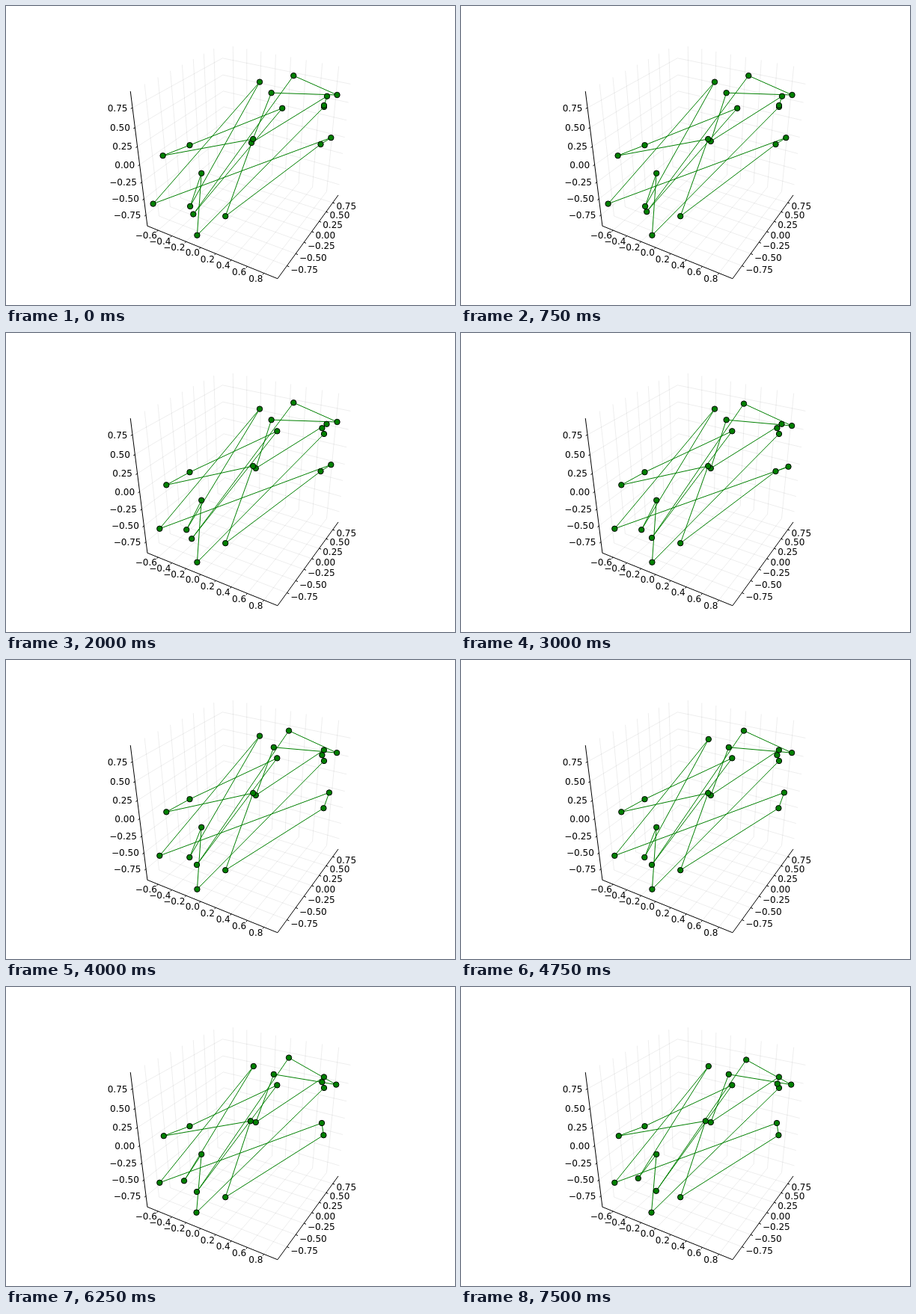
An HTML page with a canvas that plays this animation: 600 px wide and 400 px high, repeating every 8000 ms.

```html
<!DOCTYPE html>
<html lang="en">
<head>
<meta charset="utf-8">
<title>Closed path in 3D axes</title>
<style>
  html, body { margin: 0; width: 100%; height: 100%; overflow: hidden; background: #fff; }
  canvas { display: block; }
</style>
</head>
<body>
<canvas id="stage" width="600" height="400"></canvas>
<script>
const ctx = document.getElementById('stage').getContext('2d');
const LOOP = 8000;

// Vertices in the order in which the closed path visits them.
const start = {
  T: [425, 135], G: [425, 133], F: [429, 120.7], K: [328, 183], C: [354.6, 116.2],
  E: [442.5, 119], B: [384.3, 93.2], Q: [250.3, 278.5], D: [369.2, 136.8], L: [245.5, 186.2],
  M: [209.6, 200.2], J: [330.2, 178], S: [293.2, 281.2], I: [420.5, 185], H: [434.3, 176.2],
  N: [196.6, 264.6], A: [339, 101.6], P: [246.1, 268], O: [261.2, 223.8], R: [255.4, 306.7]
};

// Each accepted step: time, vertex, new position.
const moves = [
  [250, 'Q', 248.2, 275.2],
  [750, 'K', 333.8, 181],
  [1000, 'P', 241.2, 263.2],
  [1130, 'F', 428.5, 121.8],
  [1250, 'G', 422.4, 127.2],
  [1630, 'M', 214.3, 203.3],
  [1750, 'D', 362.3, 131.3],
  [2000, 'N', 205.3, 261.8],
  [2250, 'H', 437.5, 178.8],
  [2750, 'E', 442.1, 124.1],
  [2880, 'Q', 255, 274],
  [3000, 'B', 378, 94.6],
  [3250, 'H', 431.9, 177.4],
  [3250, 'F', 424.9, 120.4],
  [3500, 'I', 424.4, 198.2],
  [4000, 'P', 245.3, 264],
  [4000, 'C', 357.8, 116.8],
  [4500, 'A', 336, 106.5],
  [4750, 'A', 330.8, 106],
  [5000, 'J', 326.8, 179.3],
  [5250, 'E', 441.2, 130.6],
  [5500, 'P', 238, 259.3],
  [5500, 'R', 254.5, 301.7],
  [6250, 'M', 210.8, 199.2],
  [6250, 'H', 422, 182],
  [6500, 'P', 236.6, 257.5],
  [6750, 'Q', 260.8, 272.8],
  [6750, 'G', 422.8, 129.5],
  [6750, 'P', 235.4, 257],
  [7500, 'B', 381.2, 97.4],
  [7500, 'P', 236.8, 255.9]
];

// Perspective camera: azimuth 30, elevation 30, looking at the cube [-1, 1]^3.
const SIN = 0.5, COS = Math.sqrt(3) / 2, DIST = 6.69, SCALE = 670;
function project([x, y, z]) {
  const right = COS * x + SIN * y;
  const up = SIN * (COS * y - SIN * x) + COS * z;
  const depth = DIST + COS * (COS * y - SIN * x) - SIN * z;
  return [322.1 + SCALE * right / depth, 192 - SCALE * up / depth];
}

function axis(min, max, first, step, count, digits) {
  return Array.from({ length: count }, (_, i) => {
    const v = first + i * step;
    return {
      pos: 2 * (v - min) / (max - min) - 1,
      label: (v < -0.01 ? '\u2212' : '') + Math.abs(v).toFixed(digits)
    };
  });
}
const xs = axis(-0.76, 0.96, -0.6, 0.2, 8, 1);
const ys = axis(-1, 0.97, -0.75, 0.25, 7, 2);
const zs = axis(-0.927, 0.95, -0.75, 0.25, 7, 2);

function trace(points) {
  ctx.beginPath();
  points.forEach(p => ctx.lineTo(...p));
}
function line3d(...points) {
  trace(points.map(project));
  ctx.stroke();
}

function drawGrid() {
  ctx.strokeStyle = 'rgba(0, 0, 0, 0.07)';
  ctx.lineWidth = 1;
  xs.forEach(({ pos }) => line3d([pos, -1, -1], [pos, 1, -1], [pos, 1, 1]));
  ys.forEach(({ pos }) => line3d([1, pos, -1], [-1, pos, -1], [-1, pos, 1]));
  zs.forEach(({ pos }) => line3d([-1, -1, pos], [-1, 1, pos], [1, 1, pos]));
}

function drawTicks(ticks, at, out, align, dx, dy) {
  ctx.textAlign = align;
  ticks.forEach(({ pos, label }) => {
    const p = at(pos);
    line3d(p, p.map((v, i) => v + out[i]));
    const [x, y] = project(p);
    ctx.fillText(label, x + dx, y + dy + 4.4);
  });
}

function drawAxes() {
  ctx.strokeStyle = ctx.fillStyle = '#000';
  ctx.lineWidth = 1;
  ctx.font = '12px "DejaVu Sans", sans-serif';
  line3d([-1, -1, 1], [-1, -1, -1], [1, -1, -1], [1, 1, -1]);
  drawTicks(xs, v => [v, -1, -1], [0, -0.03, 0], 'right', -1.3, 7);
  drawTicks(ys, v => [1, v, -1], [0.03, 0, 0], 'left', 4.8, 4.7);
  drawTicks(zs, v => [-1, -1, v], [0, -0.03, 0], 'right', -6.6, 0);
}

function pathAt(t) {
  const pts = { ...start };
  for (const [time, id, x, y] of moves) if (time <= t) pts[id] = [x, y];
  return Object.values(pts);
}

function drawPath(points) {
  ctx.strokeStyle = ctx.fillStyle = '#008000';
  ctx.lineWidth = 1;
  trace(points);
  ctx.closePath();
  ctx.stroke();
  ctx.strokeStyle = '#000';
  for (const [x, y] of points) {
    ctx.beginPath();
    ctx.arc(x, y, 3.7, 0, 2 * Math.PI);
    ctx.fill();
    ctx.stroke();
  }
}

const begin = performance.now();
function frame() {
  const t = (performance.now() - begin) % LOOP;
  ctx.fillStyle = '#fff';
  ctx.fillRect(0, 0, 600, 400);
  drawGrid();
  drawAxes();
  drawPath(pathAt(t));
  requestAnimationFrame(frame);
}
frame();
</script>
</body>
</html>
```
